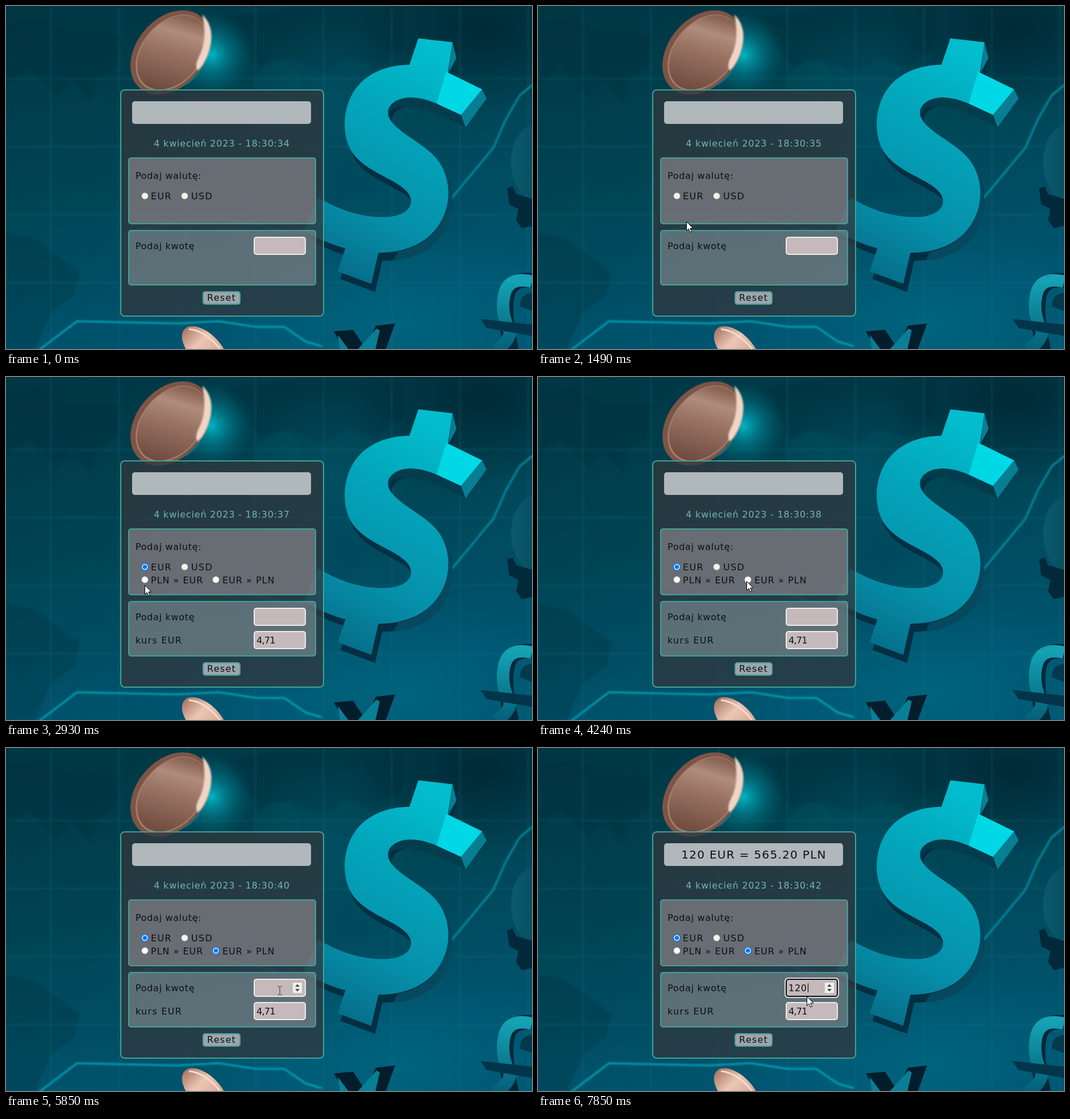
Animation, 926 px wide and 605 px high, one loop 8 s. Source, as an HTML page:

```html
<!DOCTYPE html>
<html lang="pl">
<head>
<meta charset="utf-8">
<title>Kalkulator walut</title>
<style>
html, body { margin: 0; width: 100%; height: 100%; overflow: hidden; background: #003d4d; }
svg { display: block; width: 926px; height: 605px; }
text { font: 16px "DejaVu Sans", sans-serif; letter-spacing: .7px; fill: #0d1114; white-space: pre; }
.caps { letter-spacing: 1.3px; }
.pair { letter-spacing: 1px; }
.mid { text-anchor: middle; }
.box { stroke: #40a298; stroke-width: 2; }
.field { fill: #c5b9bb; stroke: #f1ecea; stroke-width: 2; }
</style>
</head>
<body>
<svg viewBox="0 0 926 605">
<defs>
  <linearGradient id="sea" x1="0" y1="0" x2=".35" y2="1">
    <stop offset="0" stop-color="#003642"/><stop offset=".5" stop-color="#004454"/><stop offset="1" stop-color="#005570"/>
  </linearGradient>
  <radialGradient id="glow"><stop offset="0" stop-color="#00b4c4"/><stop offset=".45" stop-color="#008494" stop-opacity=".6"/><stop offset="1" stop-color="#006070" stop-opacity="0"/></radialGradient>
  <radialGradient id="dark"><stop offset="0" stop-color="#00202c" stop-opacity=".7"/><stop offset="1" stop-color="#00202c" stop-opacity="0"/></radialGradient>
  <radialGradient id="light"><stop offset="0" stop-color="#006c86" stop-opacity=".6"/><stop offset="1" stop-color="#006c86" stop-opacity="0"/></radialGradient>
  <linearGradient id="copper" gradientUnits="userSpaceOnUse" x1="-60" y1="40" x2="65" y2="-15">
    <stop offset="0" stop-color="#6f4a3c"/><stop offset=".55" stop-color="#9a7364"/><stop offset=".8" stop-color="#b08c7d"/><stop offset="1" stop-color="#8a6353"/>
  </linearGradient>
  <linearGradient id="pink"><stop offset="0" stop-color="#a87866"/><stop offset=".35" stop-color="#ecc6b4"/><stop offset="1" stop-color="#c49480"/></linearGradient>
  <linearGradient id="face" gradientUnits="userSpaceOnUse" x1="790" y1="100" x2="600" y2="480">
    <stop offset="0" stop-color="#02bdce"/><stop offset=".3" stop-color="#03a6bb"/><stop offset=".7" stop-color="#0690aa"/><stop offset="1" stop-color="#066e8a"/>
  </linearGradient>
  <linearGradient id="orb"><stop offset="0" stop-color="#0a5a6c"/><stop offset="1" stop-color="#034354"/></linearGradient>
  <linearGradient id="pound" x1="0" y1="0" x2="0" y2="1"><stop offset="0" stop-color="#14a2b4"/><stop offset="1" stop-color="#045f78"/></linearGradient>
  <filter id="soft"><feGaussianBlur stdDeviation="1.500"/></filter>
  <filter id="focusBlur" x="0" y="0" width="1" height="1"><feGaussianBlur stdDeviation=".7"/></filter>
  <g id="dollar">
    <path d="M726 57L786 64 778 118 708 110Z"/>
    <path d="M598 426L656 433 643 490 584 468Z"/>
    <path d="M838 147L801 192 758 172Q722 157 698 163C678 168 666 183 676 200C690 224 735 242 757 268C784 300 786 350 762 386C738 424 690 440 632 434C592 430 556 414 524 396L550 338C590 362 630 374 672 372C706 370 722 350 708 330C688 304 632 294 608 256C588 222 594 168 622 138C662 96 730 98 775 116Z"/>
  </g>
</defs>

<g filter="url(#focusBlur)">
  <rect width="926" height="605" fill="url(#sea)"/>
  <g fill="#002a36" opacity=".24" filter="url(#soft)">
    <path d="M0 30L60 20 110 45 200 50 195 105 160 130 150 170 115 130 90 160 40 110 0 140Z"/>
    <path d="M0 400L50 410 90 440 130 470 120 510 80 540 50 605H0Z"/>
    <path d="M380 20L520 0H700V70L650 110 600 90 560 120 500 90 450 110Z"/>
  </g>
  <circle cx="480" cy="135" r="40" fill="#00606e" opacity=".15"/>
  <ellipse cx="840" cy="40" rx="230" ry="150" fill="url(#dark)"/>
  <ellipse cx="690" cy="560" rx="330" ry="180" fill="url(#light)"/>
  <ellipse cx="570" cy="170" rx="150" ry="150" fill="url(#light)" opacity=".5"/>
  <g id="grid" fill="none" stroke="#1a7486" opacity=".22" filter="url(#soft)"></g>
  <g fill="none" stroke="#00a5b8" stroke-width="3" filter="url(#soft)">
    <path d="M58 607L125 556 300 560 375 556 440 566 490 566 528 592 556 600"/>
    <path d="M215 402L300 378 380 374 440 384 500 402" opacity=".4"/>
    <path d="M780 344L815 302 858 250 880 200 904 158 928 138" opacity=".8"/>
  </g>

  <ellipse cx="362" cy="86" rx="74" ry="76" fill="url(#glow)"/>
  <g transform="translate(289.500 82)">
    <g transform="rotate(-50)">
      <ellipse rx="83" ry="60" fill="#7d5546"/>
      <ellipse cx="1" cy="2" rx="76" ry="53" fill="#a47e6d"/>
    </g>
    <ellipse cx="2" cy="2" rx="74" ry="51" transform="rotate(-50)" fill="url(#copper)"/>
    <path d="M22 59Q42 44 55 24L50 39 35 53 8 68Z" fill="#17717d" opacity=".8"/>
    <path d="M56-67Q82-42 66 4 58 24 48 32 42 24 50 8 66-22 56-67Z" fill="#f0d5c6" filter="url(#soft)"/>
  </g>
  <ellipse cx="350" cy="605" rx="50" ry="27" transform="rotate(45 350 605)" fill="url(#pink)"/>
  <path d="M322 570Q350 572 377 605" fill="none" stroke="#f7dccd" stroke-width="3"/>

  <use href="#dollar" x="6" y="13" fill="#022f43" stroke="#022f43" stroke-width="2"/>
  <path d="M786 64L793 92 779 118ZM838 147L846 163 809 214 801 192Z" fill="#087e92"/>
  <path d="M758 172L801 192 809 214 766 193Q725 174 690 178Q676 180 674 194Q664 178 690 164Q720 154 758 172Z" fill="#033c4d"/>
  <path d="M757 268C784 300 786 350 762 386C748 410 724 427 690 433L682 449Q736 444 766 407C792 373 795 315 757 268Z" fill="#06485e"/>
  <use href="#dollar" fill="url(#face)"/>
  <path d="M775 116L838 147 801 192 758 172Z" fill="#00e2ee" opacity=".8"/>

  <ellipse cx="931" cy="276" rx="42" ry="66" fill="url(#orb)"/>
  <path d="M882 322L892 318 898 332 926 340V388L908 392 898 378 902 358 886 350Z" fill="#02293a"/>
  <path d="M577 574L611 571 632 603 651 564 685 560 668 607H596Z" fill="#021d2b"/>
  <path d="M584 580L604 607H588ZM618 607L652 569 658 572 650 607Z" fill="#087f95"/>
  <path d="M926 484Q888 480 882 512T890 607" fill="none" stroke="#02293a" stroke-width="26"/>
  <path d="M926 486Q884 476 877 510T888 575Q884 594 862 607" fill="none" stroke="url(#pound)" stroke-width="22"/>
  <path d="M835 552L926 562V582L846 568Z" fill="#02354a"/>
  <path d="M926 506Q904 508 905 530L926 538Z" fill="#03394c"/>
</g>

<rect class="box" x="202" y="148" width="357" height="399" rx="7" fill="rgb(52,55,60)" fill-opacity=".72"/>
<rect x="222" y="168" width="315" height="40" rx="5" fill="#b0b8bb"/>
<rect class="box" x="216" y="268" width="329" height="116" rx="4" fill="rgb(172,159,163)" fill-opacity=".5"/>
<rect class="box" x="216" y="396" width="329" height="96" rx="4" fill="rgb(148,163,168)" fill-opacity=".5"/>
<rect class="box" x="347" y="504" width="65" height="22" rx="4" fill="#9ba5ac"/>
<text class="mid" id="result" x="380" y="195" style="font-size:20px;letter-spacing:1.3px"></text>
<text class="mid" id="date" x="380" y="248" style="fill:#72b6b6;letter-spacing:.8px"></text>
<text x="228" y="305">Podaj walutę:</text>
<text class="caps" x="255" y="341">EUR</text>
<text class="caps" x="326" y="341">USD</text>
<text x="228" y="429">Podaj kwotę</text>
<text class="caps" x="354" y="520">Reset</text>
<rect class="field" x="437" y="408" width="90" height="30" rx="4"/>
<g id="radios"></g>
<g id="rate">
  <text class="pair" x="255" y="364">PLN » EUR</text>
  <text class="pair" x="381" y="364">EUR » PLN</text>
  <text class="caps" x="228" y="470">kurs EUR</text>
  <rect class="field" x="437" y="449" width="90" height="30" rx="4"/>
  <text x="441" y="470" style="letter-spacing:-.7px">4,71</text>
</g>
<g id="focus" fill="none">
  <rect x="435" y="406" width="94" height="34" rx="5" stroke="#fff" stroke-width="1.500"/>
  <rect x="437" y="408" width="90" height="30" rx="4" stroke="#101010" stroke-width="2"/>
</g>
<text id="amount" x="441" y="429"></text>
<path id="caret" d="M0 415V431" stroke="#000"/>
<g id="spin"><rect x="505" y="414" width="16" height="18" fill="#f0f0f0"/><path d="M509 421L513 416.500 517 421ZM509 425L513 429.500 517 425Z" fill="#484848"/></g>
<g id="tip">
  <rect x="490.500" y="442.500" width="103" height="23" fill="#fff" stroke="#888"/>
  <text x="496" y="458" style="font:12px 'Open Sans',sans-serif;letter-spacing:0;fill:#575757">Wypełnij to pole.</text>
</g>
<path id="arrow" d="M.5.5V16.500L4.200 13 6.800 19 9.400 18 6.800 12H12Z" fill="#fff" stroke="#000"/>
<path id="beam" d="M-4-7.500H-1.500L0-6.500 1.500-7.500H4M0-6.500V6.500M-4 7.500H-1.500L0 6.500 1.500 7.500H4" fill="none" stroke="#303033"/>
</svg>
<script>
const $ = id => document.getElementById(id);
const show = (id, on) => $(id).style.display = on ? '' : 'none';

let lines = '';
for (let i = 0; i < 8; i++) lines += `M${79 + i * 120} 0V605M0 ${128 + i * 120}H926`;
$('grid').innerHTML = `<path d="${lines}" stroke-width="3"/>`;

// Each radio: x, y, fill, time of its click
const radios = [[244.5, 335, '#f5f4ea', 2390], [314.5, 335, '#f5f4ea', Infinity],
                [244.5, 357.5, '#fff', Infinity], [369.5, 357.5, '#fff', 4500]];
$('radios').innerHTML = radios.map(([x, y, fill], i) =>
  `<g id="radio${i}"><circle cx="${x}" cy="${y}" r="6" fill="${fill}" stroke="#767676"/>
  <g id="dot${i}"><circle cx="${x}" cy="${y}" r="5.900" fill="#fff" stroke="#0075ff" stroke-width="1.400"/>
  <circle cx="${x}" cy="${y}" r="3.800" fill="#0075ff"/></g></g>`).join('');

// Pointer path: time, x, y
const path = [
  [720, 738, 588], [1070, 480, 500], [1490, 261, 380], [1840, 236, 350], [2260, 241, 337],
  [2720, 241, 337], [2930, 244, 367], [3070, 284, 384], [3150, 284, 384], [3360, 240, 364],
  [3690, 240, 364], [3830, 356, 366], [4030, 356, 366], [4240, 367, 360], [4430, 374, 358],
  [4500, 368, 360], [4760, 368, 360], [5590, 482, 428], [6240, 482, 428], [6440, 476, 451],
  [6580, 473, 438], [8000, 473, 438]];
const STEP = 70;

function pointer(t) {
  const i = Math.max(1, path.findIndex(k => k[0] > t));
  const [t0, x0, y0] = path[i - 1], [t1, x1, y1] = path[i];
  const u = Math.floor((t - t0) / STEP) * STEP / (t1 - t0);
  return [x0 + (x1 - x0) * u, y0 + (y1 - y0) * u];
}

const ticks = [860, 1840, 2860, 3830, 4830, 5850, 6850, 7850];
const keys = [7380, 7650, 7850];

function draw(t) {
  const [x, y] = pointer(t);
  const over = t >= 720 && x > 436 && x < 527 && y > 407 && y < 438;
  const focused = t >= 6310;
  const typed = keys.filter(k => t >= k).length;
  const amount = '120'.slice(0, typed);

  $('date').textContent = '4 kwiecień 2023 - 18:30:' + (34 + ticks.filter(k => t >= k).length);
  $('amount').textContent = amount;
  $('result').textContent = t >= 7450 ? `${amount} EUR = ${(amount * 4.71).toFixed(2)} PLN` : '';

  radios.forEach((r, i) => {
    show('radio' + i, i < 2 || t >= 2390);
    show('dot' + i, t >= r[3]);
  });
  show('rate', t >= 2390);
  show('focus', focused);
  show('spin', over || focused);
  show('tip', t >= 6110 && t < 6310);
  show('caret', focused && (t < 6850 || typed));
  $('caret').setAttribute('transform', `translate(${442.5 + 11 * typed})`);

  show('arrow', t >= 720 && !over);
  show('beam', over);
  for (const id of ['arrow', 'beam'])
    $(id).setAttribute('transform', `translate(${Math.round(x)} ${Math.round(y)})`);
}

const start = performance.now();
function loop() {
  draw((performance.now() - start) % 8000);
  requestAnimationFrame(loop);
}
loop();
</script>
</body>
</html>
```
